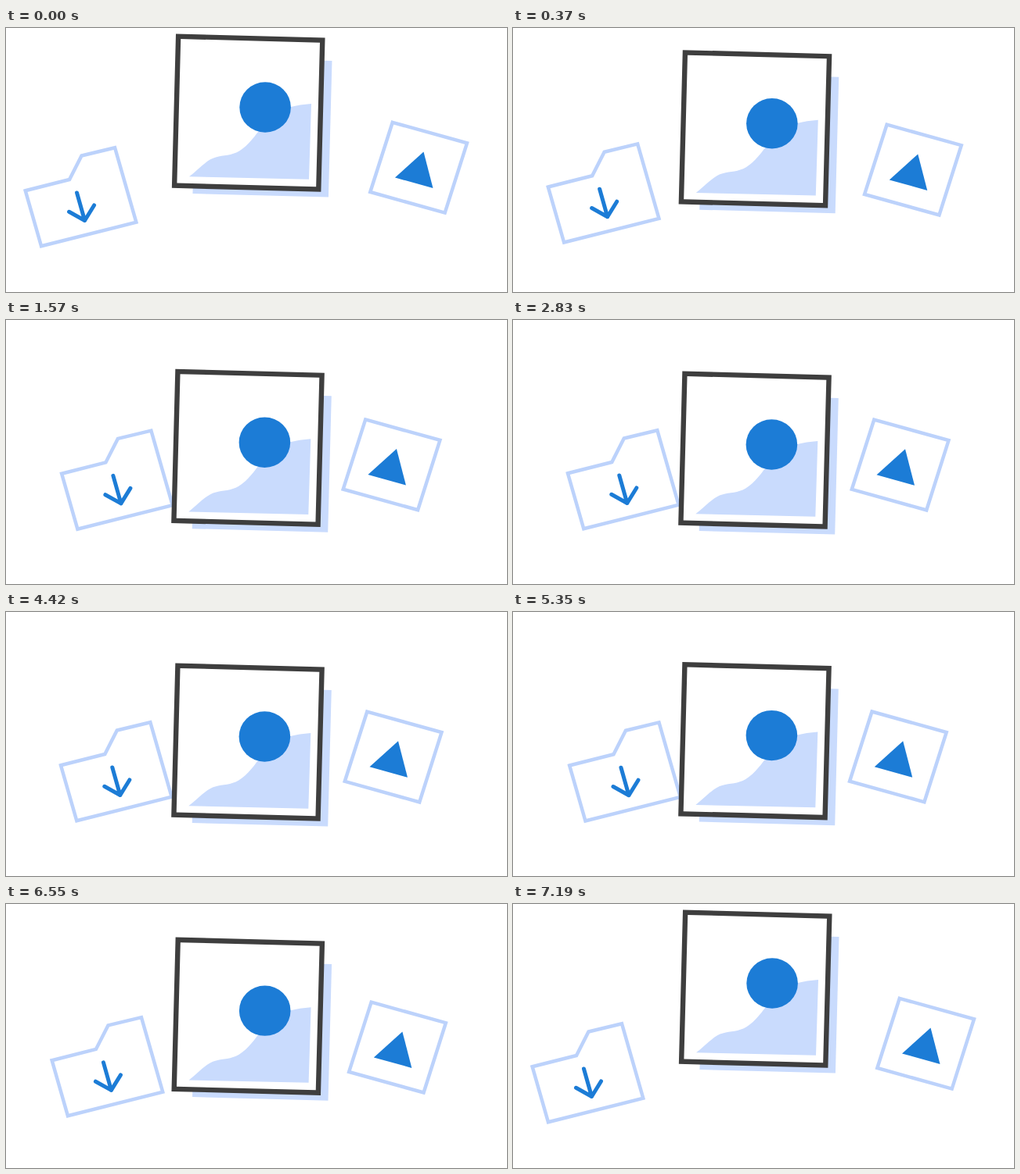
These frames come from a looping animation (640 by 338 pixels, 7.22 s). An HTML page:

```html
<!DOCTYPE html>
<html lang="en">
<head>
<meta charset="utf-8">
<title>Pictures and folder</title>
<style>
  html, body { margin: 0; width: 100%; height: 100%; overflow: hidden; background: #fff; }
  svg { display: block; width: 100%; height: 100%; }
  .outline { fill: none; stroke: #bcd2fb; stroke-width: 4.5; }
  .solid { fill: #1c7cd6; }
  .pale { fill: #c9dbfd; }
  .arrow { fill: none; stroke: #1c7cd6; stroke-width: 5; stroke-linecap: round; stroke-linejoin: round; }
  .border { fill: #fff; stroke: #3e3e3e; stroke-width: 6.4; }
</style>
</head>
<body>
<svg viewBox="0 0 640 338">
  <g id="folder">
    <path class="outline" d="M24.7 208.3 81 194 96.5 163.5 139 153.2 166.3 248.7 45 279.3Z"/>
    <path class="arrow" d="M90.5 211 100.5 246.5M80.5 235.3 100.5 246.5 112.5 227"/>
  </g>
  <g id="tile">
    <path class="outline" d="M493.8 120.8 589 147.3 560.7 236.6 465.3 210Z"/>
    <path class="solid" d="M533.5 158.5 545.5 205 497 191.5Z"/>
  </g>
  <g id="picture">
    <g transform="translate(309.7 108.6) rotate(1.5)">
      <rect class="pale" x="-68.5" y="-69.4" width="173.5" height="174.6"/>
      <rect class="border" x="-92.1" y="-95.5" width="184.2" height="191"/>
    </g>
    <path class="pale" d="M234 190.3C246 181 257 168 268 165.5 278 162.5 288 163.5 298 157.5 322 143 330 108 364 101Q375 98 390 97L387 193.7Z"/>
    <ellipse class="solid" cx="331.1" cy="101.5" rx="32.8" ry="32.2"/>
  </g>
</svg>
<script>
  const LOOP = 7220, RETURN_END = 7190;

  // Offsets (px) of each part from its spread-out pose at these times (ms).
  const times = [0, 640, 770, 1340, 1570, 1830, 2830];
  const moves = {
    picture: { x: [0, -.4, -.5, -.6, -.7, -.7, -.7], y: [0, 35.2, 40.5, 52.5, 55.2, 56.6, 58] },
    folder: { x: [0, 34, 38, 45.2, 46.4, 47.5, 45.3], y: [0, -8.1, -9.3, -11.2, -11.6, -11.8, -12] },
    tile: { x: [0, -27.2, -29.7, -33.8, -34.6, -35.3, -32.5], y: [0, 4.9, 5.5, 6.3, 6.6, 6.7, 6.8] }
  };

  const last = times.length - 1;
  const slope = (v, a, b) => (v[b] - v[a]) / (times[b] - times[a]);

  function tangent(v, i) {
    if (i === 0) return 1.5 * slope(v, 0, 1) - 0.5 * slope(v, 0, 2);
    return i === last ? 0 : slope(v, i - 1, i + 1);
  }

  // Cubic Hermite curve through the keyed values.
  function sample(v, t) {
    let i = 0;
    while (i < last - 1 && t > times[i + 1]) i++;
    const span = times[i + 1] - times[i];
    const s = (t - times[i]) / span, r = 1 - s;
    return r * r * (1 + 2 * s) * v[i] + s * s * (1 + 2 * r) * v[i + 1]
      + span * s * r * (r * tangent(v, i) - s * tangent(v, i + 1));
  }

  function draw(now) {
    const t = now % LOOP;
    const phase = Math.max(0, Math.min(t, RETURN_END - t, times[last]));
    for (const [id, { x, y }] of Object.entries(moves)) {
      document.getElementById(id).setAttribute("transform",
        `translate(${sample(x, phase).toFixed(2)} ${sample(y, phase).toFixed(2)})`);
    }
  }

  const start = performance.now();
  function tick() {
    draw(performance.now() - start);
    requestAnimationFrame(tick);
  }
  tick();
</script>
</body>
</html>
```
